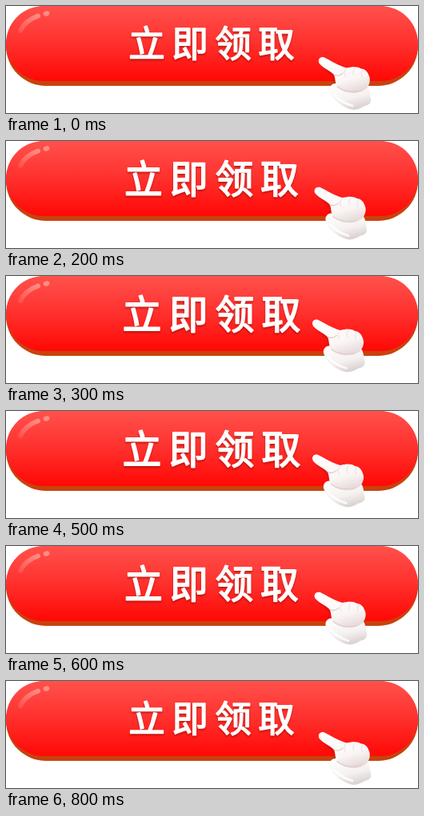
Write an HTML page that moves like this. It is 515x134 px and loops after 900 ms.

```html
<!DOCTYPE html>
<html lang="zh-CN">
<head>
<meta charset="utf-8">
<title>立即领取</title>
<style>
  html, body { margin: 0; width: 100%; height: 100%; overflow: hidden; background: #fff; }
  svg { display: block; width: 515px; height: 134px; }
  text {
    font: 500 45.5px "Noto Sans CJK SC", "Noto Sans CJK", "Noto Sans SC", sans-serif;
    letter-spacing: 8.5px;
    fill: #fff;
    stroke: #fff;
    stroke-width: 1.7px;
    stroke-linejoin: round;
  }
  #label { filter: drop-shadow(0 2px 1px rgba(150, 10, 0, .55)); }
</style>
</head>
<body>
<svg viewBox="0 0 515 134">
  <defs>
    <linearGradient id="face" x2="0" y2="1">
      <stop offset="0" stop-color="#ff514c"/>
      <stop offset=".5" stop-color="#ff302d"/>
      <stop offset="1" stop-color="#ff0805"/>
    </linearGradient>
    <linearGradient id="gloss" gradientUnits="userSpaceOnUse" x1="16" y1="34" x2="42" y2="12">
      <stop offset="0" stop-color="#ff9a90" stop-opacity=".2"/>
      <stop offset="1" stop-color="#ff9a90" stop-opacity=".85"/>
    </linearGradient>
    <linearGradient id="skin" x1=".25" y1="0" x2=".65" y2="1">
      <stop offset="0" stop-color="#fff"/>
      <stop offset=".65" stop-color="#fbf6f5"/>
      <stop offset="1" stop-color="#e5d9d8"/>
    </linearGradient>
    <linearGradient id="cuff" x1=".2" y1="0" x2=".6" y2="1">
      <stop offset="0" stop-color="#fff"/>
      <stop offset=".6" stop-color="#f5f1f0"/>
      <stop offset="1" stop-color="#d8d0cf"/>
    </linearGradient>
    <filter id="soft" x="-30%" y="-30%" width="160%" height="160%">
      <feGaussianBlur stdDeviation="1.6"/>
    </filter>
  </defs>

  <rect width="515" height="100" rx="50" fill="#c9420d"/>
  <rect width="515" height="94" rx="47" fill="url(#face)"/>
  <path d="M18 31Q24 18 40 12.5" fill="none" stroke="url(#gloss)" stroke-width="6" stroke-linecap="round"/>
  <ellipse cx="50.5" cy="9.5" rx="4" ry="3" transform="rotate(-15 50.5 9.5)" fill="#ff8d84"/>

  <g id="label"><text x="-104.3" y="17.3">立即领取</text></g>

  <g id="hand">
    <path d="M393 74L411 91L406 105Q412 119 432 128L446 126L440 96Z"
          fill="#8d1008" opacity=".35" filter="url(#soft)"/>
    <path d="M411 97C405 98 403 104 406 109C409 118 421 127 432 129.5C438 131 442 128 447 125.5
             C455 124 458 120 455.5 114C455 108 454 101 449 98Z" fill="url(#cuff)"/>
    <path d="M398 64.5C392 62.5 388.5 68.5 392.5 73C397 78 405 81 410 86C412 91 411 96 414 101
             C421 109 437 112 448 105C453 103 456.5 94 454 88C452 82 449 79 444 78.5
             C439 75 432 76 426 77.5C416 75 407 69 398 64.5Z" fill="url(#skin)"/>
    <g fill="none" stroke-linecap="round">
      <path d="M410 86Q416 89 421 84M414 101Q425 110 444 106" stroke="#dfcfcd" stroke-width="1.3"/>
      <path d="M425 79Q421 83 424 88M436 78Q432 83 435 87M446 80Q443 85 445 89"
            stroke="#e8dddc" stroke-width="1"/>
      <path d="M410 111Q419 121 433 125" stroke="#fff" stroke-width="3" opacity=".8"/>
    </g>
  </g>
</svg>
<script>
  const STEP = 100, STEPS = 9, PEAK = 4;
  const label = document.getElementById("label");
  const hand = document.getElementById("hand");

  function draw() {
    const step = Math.floor(performance.now() / STEP) % STEPS;
    const lift = PEAK - Math.abs(PEAK - step);
    label.setAttribute("transform", `translate(257.5 47) scale(${1 + lift * 0.025})`);
    hand.setAttribute("transform", `translate(${-2.6 * lift} ${-3.2 * lift})`);
    requestAnimationFrame(draw);
  }
  draw();
</script>
</body>
</html>
```
